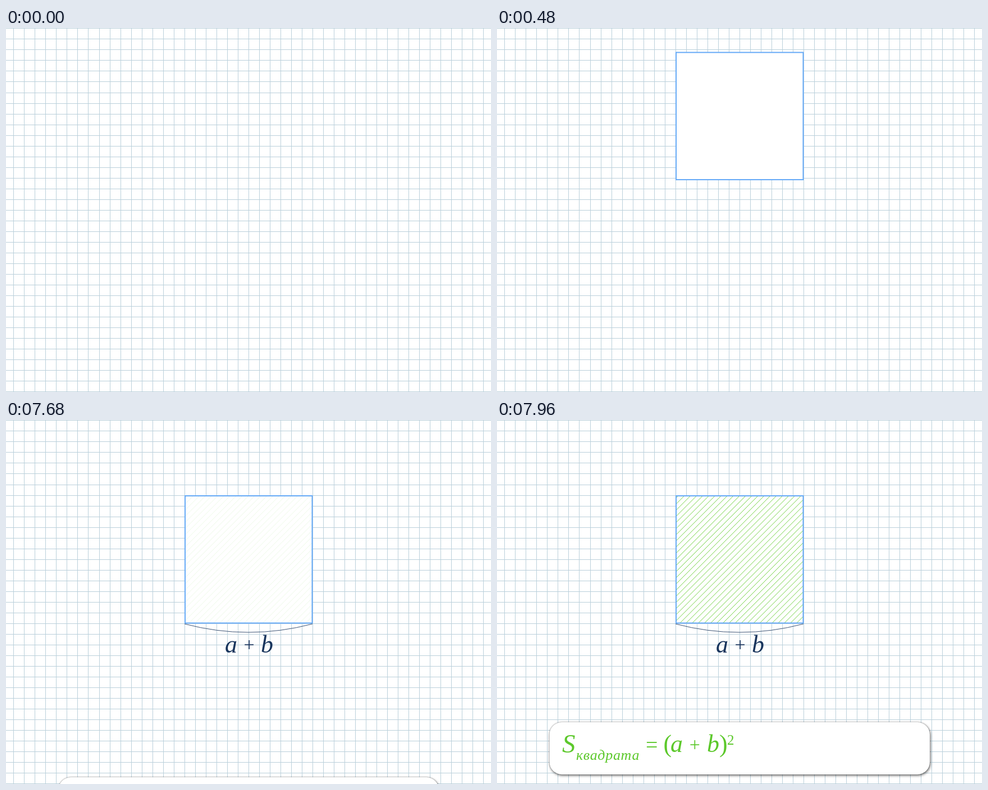
These frames come from a looping animation (864x648 px, 8000 ms). An HTML page:

```html
<!DOCTYPE html>
<html lang="ru">
<head>
<meta charset="utf-8">
<title>Площадь квадрата</title>
<style>
  html, body { margin: 0; width: 100%; height: 100%; overflow: hidden; background: #fff; }
  svg { display: block; width: 864px; height: 648px; }
  text { font-family: "Liberation Serif", "Noto Serif", serif; font-size: 44px; white-space: pre; }
  .it { font-style: italic; }
  .plus { font-size: 34px; }
  #grid { fill: #bbd0db; shape-rendering: crispEdges; }
  #label { fill: #19355d; }
  #formula { fill: #5cc82b; }
  #card { filter: drop-shadow(0 0 1px rgba(0, 0, 0, .4)) drop-shadow(1.5px 2px 2px rgba(0, 0, 0, .55)); }
</style>
</head>
<body>
<svg viewBox="0 0 864 648">
  <defs>
    <clipPath id="inside"><rect x="319" y="135" width="226.5" height="226.5"/></clipPath>
  </defs>
  <path id="grid"/>
  <g id="square">
    <rect x="319" y="135" width="226.5" height="226.5" fill="#fff"/>
    <g clip-path="url(#inside)">
      <path id="hatch" fill="none" stroke="#72d143" stroke-width="1"/>
    </g>
    <rect x="319" y="135" width="226.5" height="226.5" fill="none" stroke="#66aaf7" stroke-width="2"/>
  </g>
  <g id="label">
    <path d="M318 363Q432 393 546 363" fill="none" stroke="#3d5475" stroke-width="1"/>
    <text class="it" x="390" y="413.5">a</text>
    <text class="plus" x="423.6" y="410.5">+</text>
    <text class="it" x="454" y="413.5">b</text>
  </g>
  <g id="panel">
    <rect id="card" x="93.5" y="538" width="677.5" height="93" rx="22" fill="#fff"/>
    <g id="formula">
      <text class="it" x="116" y="591.5" style="font-size:47px">S</text>
      <text class="it" x="141" y="605" style="font-size:26px;letter-spacing:.7px">квадрата</text>
      <text x="265" y="591" style="font-size:38px">=</text>
      <text x="296.5" y="590.5">(</text>
      <text class="it" x="309" y="591">a</text>
      <text class="plus" x="342.7" y="588.5">+</text>
      <text class="it" x="374" y="591">b</text>
      <text x="396" y="590.5">)</text>
      <text x="410" y="578" style="font-size:25px">2</text>
    </g>
  </g>
</svg>
<script>
  const LOOP = 8000, STEP = 40, CELL = 19.02;
  const el = id => document.getElementById(id);
  const clamp01 = v => Math.min(1, Math.max(0, v));
  const show = (node, on) => node.setAttribute("visibility", on ? "visible" : "hidden");
  const shift = (node, y) => node.setAttribute("transform", `translate(0 ${y})`);

  function gridPath() {
    let d = "";
    for (let x = 13.85; x < 864; x += CELL) d += `M${Math.floor(x)} 0h1v648h-1z`;
    for (let y = 0.89; y < 648; y += CELL) d += `M0 ${Math.floor(y)}h864v1h-864z`;
    return d;
  }

  // Diagonals are lines of constant x + y.
  function hatchPath() {
    let d = "";
    for (let s = 457.7; s < 908; s += 10.94) d += `M${s - 365} 365L${s - 130} 130`;
    return d;
  }

  const square = el("square"), hatch = el("hatch"), label = el("label"), panel = el("panel");
  el("grid").setAttribute("d", gridPath());
  hatch.setAttribute("d", hatchPath());

  function draw(time) {
    const t = Math.floor(time / STEP) * STEP;
    shift(square, -366 * (1 - clamp01(t / 640)));
    show(label, t >= 5640);
    hatch.setAttribute("opacity", clamp01((t - 7640) / 320));
    show(panel, t >= 7680);
    shift(panel, 0.35 * (7960 - t));
  }

  let start;
  function tick(now) {
    start ??= now;
    draw(Math.max(0, now - start) % LOOP);
    requestAnimationFrame(tick);
  }
  draw(0);
  requestAnimationFrame(tick);
</script>
</body>
</html>
```
